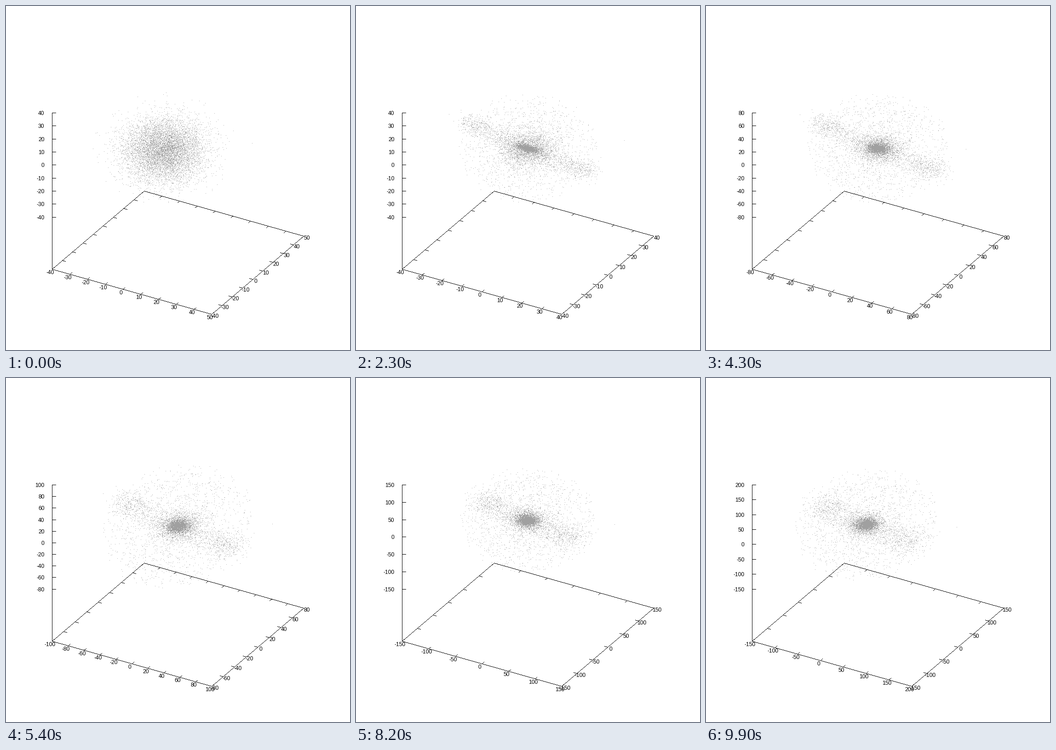
Animation, 748 px wide and 748 px high, one loop 10 s. Source, as a matplotlib script:

```python
import numpy as np
import matplotlib.pyplot as plt
from matplotlib.animation import FuncAnimation

SIZE, DPI, FRAMES = 748, 100, 100
WHITE, DOT, INK = 255, 160, 0
N_CORE, N_HALO, N_JET, N_SHELL = 2800, 2200, 1000, 1400
N = N_CORE + N_HALO + N_JET + N_SHELL

# Stage geometry: base corner and the pixel vectors of the three axes
BASE = np.array([100.0, 572.0])
FLOOR = np.array([100.0, 458.6])
EX, EY, EZ = np.array([[347.0, 98.0], [200.0, -170.0], [0.0, -226.6]])
IN_X, IN_Y, IN_Z = np.array([[4.2, -3.6], [-7.0, -2.0], [8.0, 0.0]])

# Extent of the cloud along each axis over time (seconds)
KNOTS = [0, 1.3, 2.0, 3.2, 5.4, 6.8, 8.2, 9.9]
EXTENT = [
    ([-32, -28, -26, -46, -83, -103, -122, -143],
     [41, 37, 34, 53, 88, 115, 134, 155]),
    ([-32, -28, -26, -48, -79.5, -98, -118, -140],
     [41.5, 37, 27, 48, 79.6, 98, 118, 140]),
    ([-36, -35, -27, -48, -79.5, -99, -118, -143],
     [36, 35, 27, 48, 82, 108, 120, 151]),
]
# The lone runaway star follows the largest x
STAR = [EXTENT[0][1],
        [15, 13, 15, 20.5, 42, 45, 51, 64],
        [11, 13, 11, 9, 3, 9, 8, 3]]

rng = np.random.default_rng(11)


def smooth(x):
    x = np.clip(x, 0, 1)
    return x * x * (3 - 2 * x)


def ball(n, power):
    d = rng.normal(size=(n, 3))
    d /= np.linalg.norm(d, axis=1, keepdims=True)
    return d * rng.random((n, 1)) ** power


def stream(n, direction):
    d = np.array(direction) / np.linalg.norm(direction)
    clump = rng.random(n) < 0.45
    s = np.where(clump, rng.normal(0.82, 0.1, n), rng.uniform(0.2, 0.95, n))
    return s[:, None] * d


# Initial cloud, inner particles first so that they end up in the core
start = rng.normal(0, 9.6, (N, 3))
radius = np.linalg.norm(start, axis=1)
start *= np.minimum(1, 36 / radius)[:, None]
start = start[np.argsort(radius * rng.uniform(0.45, 1.55, N))]
radius = np.linalg.norm(start, axis=1)
fall = np.clip(2.03 * (radius / 24) ** 1.5, 0.7, 3.6)[:, None]

core = rng.normal(size=(N_CORE, 3)) * rng.uniform(0.1, 1.4, (N_CORE, 1))
halo = rng.normal(size=(N_HALO, 3)) * rng.uniform(0.5, 1.3, (N_HALO, 1))
halo_ball = ball(N_HALO, 0.4)
jets = np.vstack([stream(N_JET // 2, (-37, -2, 11)),
                  stream(N_JET // 2, (38, 1, -6.5))])
drift = rng.normal(size=(N_JET, 3))
shell = ball(N_SHELL, 0.42)


def front(t):
    """Radius of the expanding shell."""
    s = t - 1.3
    return max(3, 12 + 12 * s + 23 * (1 - np.exp(-s / 2.2)))


def spin(p, t):
    a = 1.6 * t / (1 + np.hypot(p[:, 0], p[:, 1]))
    c, s = np.cos(a), np.sin(a)
    return np.column_stack([c * p[:, 0] - s * p[:, 1],
                            s * p[:, 0] + c * p[:, 1], p[:, 2]])


def cloud(t):
    r = front(t)
    width = 0.25 + 0.75 * smooth((t - 1.3) / 4.4)
    disc = spin(core, t) * (1.4 + 0.62 * t) * [1, width, 0.28]
    loose = spin(halo, t) * (5 + 1.1 * t) * [1, 1, 0.65]
    k = smooth((t - 1.3) / 1.3)
    mid = (1 - k) * halo_ball * r + k * loose
    slow = 1 - 0.24 * smooth((t - 3) / 6)
    beams = (jets * slow + drift * (0.07 + 0.005 * t)) * r
    goal = np.vstack([disc, mid, beams, shell * r])
    infall = start * np.cos(np.pi / 2 * np.minimum(t / fall, 1))
    pos = infall + goal * smooth((t - 0.8 * fall) / 0.5)
    star = [np.interp(t, KNOTS, c) for c in STAR]
    return np.vstack([pos, star])


def scale(t, lo, hi):
    """Autoscaled limits and tick values of one axis."""
    lo, hi = np.interp(t, KNOTS, lo), np.interp(t, KNOTS, hi)
    span = hi - lo
    step = 10 if span <= 100 else 20 if span <= 200 else 50
    lo, hi = step * np.floor(lo / step), step * np.ceil(hi / step)
    return lo, hi, np.arange(lo, hi + step / 2, step)


def plot(img, xy, shade):
    x, y = np.clip(np.rint(xy).astype(int), 0, SIZE - 1).T
    img[y, x] = shade


def line(img, a, b):
    """One pixel wide line without smoothing."""
    a, b = np.rint(a), np.rint(b)
    n = int(np.abs(b - a).max()) + 1
    plot(img, np.linspace(a, b, n), INK)


fig = plt.figure(figsize=(SIZE / DPI, SIZE / DPI), dpi=DPI, facecolor="white")
ax = fig.add_axes([0, 0, 1, 1])
canvas = ax.imshow(np.full((SIZE, SIZE), WHITE, np.uint8), cmap="gray",
                   vmin=0, vmax=255, interpolation="nearest", aspect="auto")
ax.set_xlim(-0.5, SIZE - 0.5)
ax.set_ylim(SIZE - 0.5, -0.5)
ax.axis("off")
labels = [ax.text(0, 0, "", family="Liberation Sans", size=12 * 72 / DPI,
                  color="black", va="center_baseline")
          for _ in range(60)]


def update(i):
    t = i / 10
    axes = [scale(t, *e) for e in EXTENT]
    img = np.full((SIZE, SIZE), WHITE, np.uint8)

    lo = np.array([a[0] for a in axes])
    hi = np.array([a[1] for a in axes])
    unit = (cloud(t) - lo) / (hi - lo)
    plot(img, FLOOR + unit @ np.array([EX, EY, EZ]), DOT)

    line(img, BASE, BASE + EX)
    line(img, BASE, BASE + EY)
    line(img, BASE + EX, BASE + EX + EY)
    line(img, BASE + EY, BASE + EX + EY)
    line(img, BASE, FLOOR + EZ)

    words = []
    for n, (low, high, values) in enumerate(axes):
        for v in values:
            f = (v - low) / (high - low)
            if n == 0:
                p = BASE + f * EX
                line(img, p, p + IN_X)
                line(img, p + EY, p + EY - IN_X)
                words.append((p + [-4.7, 6], v, "center"))
            elif n == 1:
                p = BASE + f * EY
                line(img, p, p - IN_Y)
                line(img, p + EX, p + EX + IN_Y)
                words.append((p + EX + [6.7, 3], v, "center"))
            else:
                p = FLOOR + f * EZ
                line(img, p, p + IN_Z)
                words.append((p + [-17, 0], v, "right"))
    canvas.set_data(img)

    for label in labels:
        label.set_text("")
    for label, (p, v, align) in zip(labels, words):
        label.set_position(p)
        label.set_text(str(int(round(v))))
        label.set_ha(align)
    return [canvas, *labels]


anim = FuncAnimation(fig, update, frames=FRAMES, interval=100,
                     repeat=True, repeat_delay=0, blit=False)
plt.show()
```
